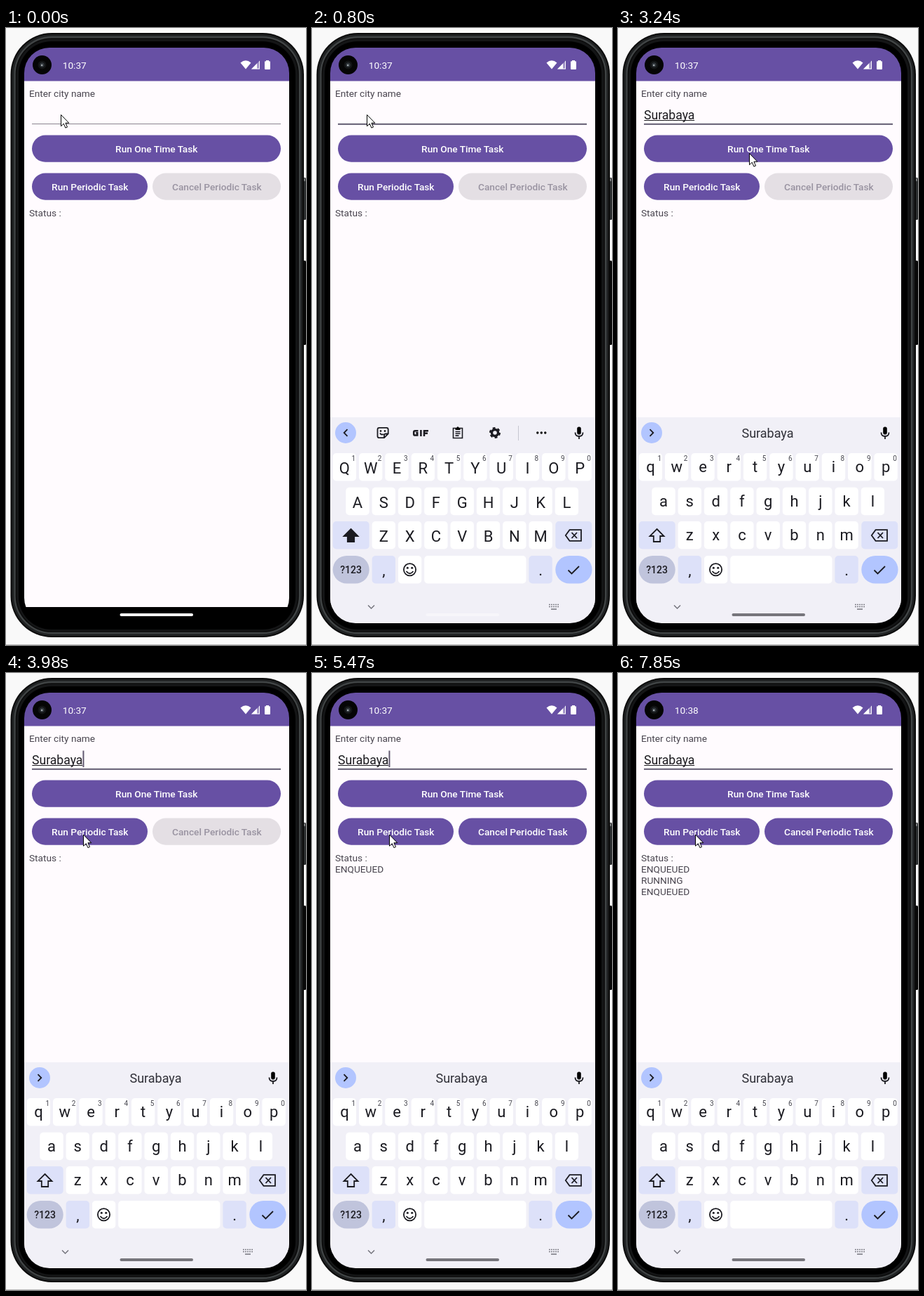
These frames come from a looping animation (428x878 px, 8 s). An HTML page:

```html
<!DOCTYPE html>
<html lang="en">
<head>
<meta charset="utf-8">
<title>Periodic task demo</title>
<style>
html, body { margin: 0; width: 100%; height: 100%; overflow: hidden; background: #f9f9f9; }
svg { display: block; width: 428px; height: 878px; }
text { font-family: Roboto, sans-serif; }
.label { font-size: 13.68px; fill: #49454f; }
.btn { font-size: 13.68px; font-weight: 500; fill: #fff; text-anchor: middle; }
.key { font-size: 22px; fill: #1b1b21; text-anchor: middle; }
.hint { font-size: 10px; fill: #46464f; text-anchor: middle; }
.word { font-size: 18px; fill: #303038; text-anchor: middle; }
.line { fill: none; stroke: #1b1b21; stroke-width: 1.8; }
</style>
</head>
<body>
<svg viewBox="0 0 428 878">
  <defs>
    <clipPath id="screenClip"><rect x="26" y="28" width="378" height="819" rx="36"/></clipPath>
    <clipPath id="runClip"><rect x="37" y="206.5" width="165" height="38.2" rx="19.1"/></clipPath>
  </defs>
  <rect width="428" height="878" fill="#f9f9f9"/>
  <rect y="877" width="428" height="1" fill="#bdbdbd"/>

  <!-- phone body -->
  <rect x="422" y="213" width="6" height="60" rx="1.5" fill="#2b2e2f"/>
  <rect x="424" y="214" width="3" height="4" fill="#77797a"/>
  <rect x="422" y="331" width="6" height="120" rx="1.5" fill="#080808"/>
  <rect x="6.5" y="7" width="418.5" height="860" rx="59" fill="#0a0a0a"/>
  <rect x="10" y="10.5" width="411.5" height="853" rx="55.5" fill="none" stroke="#1f2122" stroke-width="3"/>
  <rect x="12.5" y="13" width="406.5" height="848" rx="53" fill="none" stroke="#404445" stroke-width="2.4"/>
  <rect x="15" y="15.5" width="401.5" height="843" rx="50.5" fill="#141516"/>
  <rect x="18" y="19" width="395" height="837" rx="47" fill="#000"/>

  <g clip-path="url(#screenClip)">
    <rect x="26" y="75" width="378" height="749" fill="#fffbfe"/>
    <rect x="26" y="28" width="378" height="47.5" fill="#6750a4"/>
    <text id="clock" x="80.7" y="57.8" font-size="13.7" fill="#fff"></text>
    <path d="M334.5 49.5Q342 43.2 349.5 49.5L342 58.5Z" fill="#fff"/>
    <path d="M362 46.5V58.5H350Z" fill="#fff" opacity=".35"/>
    <path d="M358.2 50.3V58.5H350ZM362 46.5V58.5H350.5L351.5 57.5H361V47.5Z" fill="#fff"/>
    <path d="M371 47.3V46H375V47.3H376Q377 47.3 377 48.3V58Q377 59 376 59H370Q369 59 369 58V48.3Q369 47.3 370 47.3Z" fill="#fff"/>

    <text class="label" x="33" y="97.7">Enter city name</text>
    <rect id="rule" x="37" width="355"/>
    <text id="city" x="37" y="129.8" font-size="17.6" fill="#1c1b1f"></text>
    <rect id="under" x="37.3" y="131" height="1" fill="#1c1b1f"/>
    <rect id="caret" y="110.5" width="2" height="23.5" fill="#625b71"/>

    <rect x="37" y="152.6" width="355" height="38.2" rx="19.1" fill="#6750a4"/>
    <text class="btn" x="214.8" y="177.2">Run One Time Task</text>
    <rect x="37" y="206.5" width="165" height="38.2" rx="19.1" fill="#6750a4"/>
    <g clip-path="url(#runClip)" fill="#fff">
      <rect id="press" x="37" y="206" width="165" height="39"/>
      <circle id="ripple" cx="111" cy="230"/>
    </g>
    <text class="btn" x="119.8" y="231.1">Run Periodic Task</text>
    <rect id="cancel" x="209" y="206.5" width="183" height="38.2" rx="19.1"/>
    <text id="cancelText" class="btn" x="300.8" y="231.1">Cancel Periodic Task</text>
    <g id="status"></g>

    <g id="keyboard">
      <rect x="26" y="554" width="378" height="330" fill="#f1f0f7"/>
      <g id="keys"></g>
      <circle cx="48" cy="576" r="15" fill="#b2c5ff"/>
      <path id="chevron" class="line"/>
      <g id="tools">
        <path class="line" d="M96 568.8H106.2Q108.7 568.8 108.7 571.3V577.5L103 583.2H96Q93.5 583.2 93.5 580.7V571.3Q93.5 568.8 96 568.8ZM108.7 577.5H105Q103 577.5 103 579.5V583M97 576.5Q99 579.7 102 578"/>
        <circle cx="98" cy="573.5" r="1.3"/><circle cx="104" cy="573.5" r="1.3"/>
        <path class="line" style="stroke-width:2.5" d="M151.5 573.2H147.2Q145.2 573.2 145.2 575V578Q145.2 579.6 147.2 579.6H150.3V576.3H148.3M155.4 572V581M160 581V573.2H166M160 576.8H165"/>
        <path class="line" style="stroke-width:1.6" d="M201.5 569.5H214.5V583.5H201.5ZM204.5 574.5H211.5M204.5 577.3H211.5M204.5 580.1H209.5"/>
        <path d="M204.5 569H206.2Q208 565.5 209.8 569H211.5V572H204.5Z"/>
        <circle cx="261" cy="576" r="4.5" fill="none" stroke="#1b1b21" stroke-width="3.4"/>
        <circle cx="261" cy="576" r="6.8" fill="none" stroke="#1b1b21" stroke-width="2.4" stroke-dasharray="3.8 3.32"/>
        <rect x="294" y="566" width="1" height="21" fill="#c6c6d0"/>
        <circle cx="321.8" cy="576" r="1.7"/><circle cx="327.3" cy="576" r="1.7"/><circle cx="332.8" cy="576" r="1.7"/>
      </g>
      <g id="words">
        <g id="splits" fill="#c6c6d0"><rect x="161" y="565" width="1" height="23"/><rect x="266" y="565" width="1" height="23"/></g>
        <text class="word" x="114" y="583"></text>
        <text class="word" x="213.5" y="583"></text>
        <text class="word" x="312.5" y="583"></text>
      </g>
      <rect x="378.2" y="567.5" width="5.6" height="11" rx="2.8"/>
      <path class="line" d="M375.5 575.5Q375.5 581 381 581T386.5 575.5M381 581V585"/>
      <path class="line" d="M80 821.5L84.5 826L89 821.5" style="stroke:#75757d;stroke-width:1.5"/>
      <path d="M338 820.5H352M338 823.5H352" stroke="#75757d" stroke-width="1.6" stroke-dasharray="1.8 1.25"/>
      <path d="M341 827H349" stroke="#75757d" stroke-width="1.6"/>
    </g>
    <rect id="handle" x="162.5" y="833" width="104.5" height="4" rx="2"/>
  </g>

  <circle cx="51.5" cy="52.5" r="13.5" fill="#050505"/>
  <circle cx="51.5" cy="52.5" r="6" fill="#121415"/>
  <circle cx="51.5" cy="52.5" r="3.2" fill="#30363a"/>
  <circle cx="51.2" cy="53" r="1.2" fill="#a9b0b4"/>
  <path id="pointer" d="M0 0V16.2L3.8 12.7L6.4 18.6L9 17.5L6.4 11.7H11.3Z" fill="#fff" stroke="#000" stroke-linejoin="round"/>
</svg>
<script>
const LOOP = 8000;
const $ = id => document.getElementById(id);
const set = (el, attrs) => { for (const k in attrs) el.setAttribute(k, attrs[k]); };
const show = (el, on) => el.setAttribute('visibility', on ? 'inherit' : 'hidden');
const clamp = v => Math.min(1, Math.max(0, v));
const ease = v => v * v * (3 - 2 * v);
const mix = (a, b, p) => a + (b - a) * p;
function add(parent, tag, attrs, text = '') {
  const el = document.createElementNS('http://www.w3.org/2000/svg', tag);
  set(el, attrs);
  el.textContent = text;
  parent.appendChild(el);
  return el;
}
// latest entry of a [time, value] list
const at = (list, t) => list.reduce((v, e) => t >= e[0] ? e[1] : v, list[0][1]);

const typed = [[0, ''], [940, 'S'], [1070, 'Su'], [1270, 'Sur'], [1750, 'Surab'],
  [1890, 'Suraba'], [2020, 'Surabay'], [2160, 'Surabaya']];
const hints = [[0, ''], [940, 'S,So,She'], [1130, 'Su,Sun,Sugar'], [1330, 'Sur,Sure,Sir'], [2230, ',Surabaya,']];
const blink = [[0, 0], [140, 1], [670, 0], [940, 1], [2300, 0], [2780, 1], [3240, 0],
  [3710, 1], [5670, 0], [6130, 1], [6590, 0], [7120, 1], [7580, 0]];
const states = [[0, 0], [5470, 1], [5540, 2], [7850, 3]];
const handle = [[0, '#fff'], [735, '#f7f6fa'], [1890, '#76757b']];
const mouse = [[0, 79, 123], [2300, 79, 123], [2640, 188, 178], [3300, 188, 178],
  [3700, 97, 229], [3900, 111, 229.5], [LOOP, 111, 229.5]];

// keyboard
const PITCH = 37.3, letters = [], keys = $('keys');
const cap = (x, y, w, fill = '#fff', rx = 5) => add(keys, 'rect', { x, y, width: w, height: 39.5, rx, fill });
function letterRow(chars, first, y, base) {
  [...chars].forEach((ch, i) => {
    const x = first + i * PITCH;
    cap(x - 16.7, y, 33.4);
    letters.push({ el: add(keys, 'text', { class: 'key', x }), ch, base });
  });
}
letterRow('qwertyuiop', 46.4, 605, 632);
letterRow('asdfghjkl', 65, 653.7, 680.5);
letterRow('zxcvbnm', 102.3, 702, 729);
[...'1234567890'].forEach((d, i) => add(keys, 'text', { class: 'hint', x: 59.3 + i * PITCH, y: 616 }, d));
cap(29.7, 702, 52, '#dde1f9');
cap(347.3, 702, 52, '#dde1f9');
cap(29.7, 751, 52, '#c0c4dc', 19.75);
cap(85.6, 751, 33.4, '#dde1f9');
cap(122.9, 751, 33.4);
cap(160.2, 751, 145.3);
cap(309.4, 751, 33.4, '#dde1f9');
cap(347.3, 751, 52.3, '#b2c5ff', 19.75);
add(keys, 'text', { class: 'key', x: 55.6, y: 776, style: 'font-size:14px;font-weight:500' }, '?123');
add(keys, 'text', { class: 'key', x: 102.3, y: 779 }, ',');
add(keys, 'text', { class: 'key', x: 326.1, y: 779 }, '.');
const stroke = d => add(keys, 'path', { class: 'line', d });
const shift = stroke('M55.5 713L65.5 723H60.2V731H50.8V723H45.5Z');
stroke('M367.5 714.2H384V729.8H367.5L361.8 722ZM370.5 718L378 726M378 718L370.5 726');
stroke('M365.5 771.5L370.5 776.5L381 766');
add(keys, 'circle', { class: 'line', cx: 139.5, cy: 770.7, r: 8.6 });
stroke('M134.5 773Q139.5 779.5 144.5 773');
for (const cx of [136.3, 142.7]) add(keys, 'circle', { cx, cy: 768.2, r: 1.5, fill: '#1b1b21' });

const lines = ['Status :', 'ENQUEUED', 'RUNNING', 'ENQUEUED'].map((s, i) =>
  add($('status'), 'text', { class: 'label', x: 33, y: 267.6 + i * 16.1 }, s));
const wordEls = [...$('words').querySelectorAll('text')];

function drawField(t) {
  const text = at(typed, t), focus = t >= 70;
  $('city').textContent = text;
  const w = text ? $('city').getComputedTextLength() : 0;
  set($('rule'), { y: focus ? 135.8 : 136, height: focus ? 2 : 1, fill: focus ? '#625b71' : '#8b8590' });
  set($('under'), { width: Math.max(0, w - 0.6) });
  set($('caret'), { x: 37 + w });
  show($('under'), text);
  show($('caret'), at(blink, t));
}

function drawKeyboard(t) {
  const up = t >= 735 && t < 940, text = at(typed, t);
  const step = Math.floor((t - 540) / 65) * 65;
  const drop = 170 * Math.pow(1 - clamp(step / 200), 4.33);
  show($('keyboard'), t >= 540);
  set($('keyboard'), { transform: `translate(0 ${drop.toFixed(2)})` });
  for (const k of letters) {
    k.el.textContent = up ? k.ch.toUpperCase() : k.ch;
    set(k.el, { y: k.base + (up ? 2 : 0) });
  }
  shift.style.fill = up ? '#1b1b21' : 'none';
  show($('tools'), !text);
  show($('words'), text);
  set($('chevron'), { d: text ? 'M45.5 571.2L50.3 576L45.5 580.8' : 'M50.5 571.2L45.7 576L50.5 580.8' });
  const words = at(hints, t).split(',');
  wordEls.forEach((el, i) => el.textContent = words[i] || '');
  show($('splits'), text && words[0]);
  set($('handle'), { fill: at(handle, t) });
}

function drawTask(t) {
  const n = at(states, t), live = n === 1 || n === 3;
  lines.forEach((el, i) => show(el, i <= n));
  set($('cancel'), { fill: live ? '#6750a4' : '#e4dfe4' });
  $('cancelText').style.fill = live ? '#fff' : '#9993a1';
  $('clock').textContent = t < 5600 ? '10:37' : '10:38';
  const fade = 1 - clamp((t - 4500) / 310);
  set($('press'), { opacity: t < 4120 ? 0 : 0.08 * fade });
  set($('ripple'), { r: 20 + 85 * ease(clamp((t - 4200) / 350)), opacity: t < 4200 ? 0 : 0.12 * fade });
}

function drawPointer(t) {
  const i = mouse.findIndex(m => m[0] > t), a = mouse[i - 1], b = mouse[i];
  const p = ease((t - a[0]) / (b[0] - a[0]));
  set($('pointer'), { transform: `translate(${mix(a[1], b[1], p) - 0.5} ${mix(a[2], b[2], p) + 0.5})` });
}

function frame() {
  const t = performance.now() % LOOP;
  drawField(t);
  drawKeyboard(t);
  drawTask(t);
  drawPointer(t);
  requestAnimationFrame(frame);
}
frame();
</script>
</body>
</html>
```
